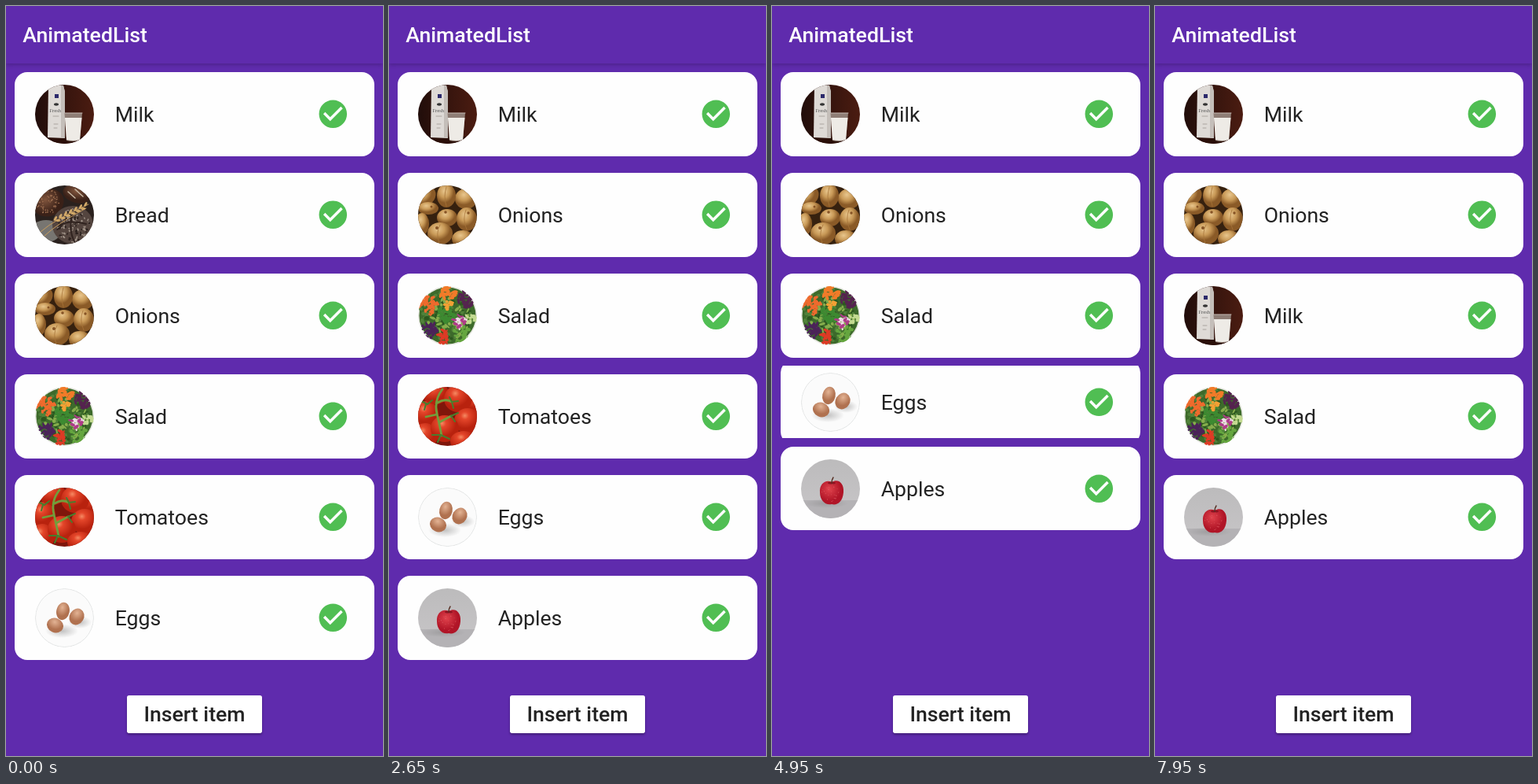
An HTML page that plays this animation: 480 px wide and 953 px high, repeating every 8 s.

```html
<!DOCTYPE html>
<html lang="en">
<head>
<meta charset="utf-8">
<title>AnimatedList</title>
<style>
  html, body { margin: 0; width: 100%; height: 100%; overflow: hidden; background: #5f2bad; }
  body { position: relative; font: 400 26.67px/32px Roboto, sans-serif; color: #222; }
  header {
    position: absolute; inset: 0 0 auto; height: 73.33px; box-sizing: border-box; z-index: 1;
    padding: 21px 21.33px; background: #5f2bad; color: #fff; font-weight: 500;
    box-shadow: 0 2px 5px rgba(0, 0, 0, .2);
  }
  main { position: absolute; top: 73.33px; left: 0; right: 0; height: 773.33px; overflow: hidden; }
  .slot { display: flex; align-items: center; overflow: hidden; margin: 0 10.67px; }
  .card {
    position: relative; flex: 0 0 100%; height: 106.67px;
    background: #fefefe; border-radius: 16px;
  }
  .card > * { position: absolute; }
  .photo { left: 26.4px; top: 15.8px; width: 75px; height: 75px; border-radius: 50%; overflow: hidden; }
  .label { left: 128px; top: 38px; }
  .check { left: 384px; top: 32px; width: 42.67px; height: 42.67px; fill: #50be53; }
  #insert {
    position: absolute; left: 154px; top: 875.7px; width: 172px; height: 48px;
    border-radius: 2.67px; text-align: center; line-height: 49px; font-weight: 500;
    box-shadow: 0 2px 3px rgba(0, 0, 0, .3);
  }
</style>
</head>
<body>
<svg width="0" height="0" style="position:absolute">
  <defs>
    <linearGradient id="wood"><stop stop-color="#210d0a"/><stop offset="1" stop-color="#4b1c11"/></linearGradient>
    <linearGradient id="wall" x2="0" y2="1"><stop stop-color="#bcbbbc"/><stop offset="1" stop-color="#c8c6c8"/></linearGradient>
    <radialGradient id="onion" cx=".4" cy=".3"><stop stop-color="#e8c68d"/><stop offset=".55" stop-color="#c99a58"/><stop offset="1" stop-color="#8a5a27"/></radialGradient>
    <radialGradient id="tomato" cx=".4" cy=".3"><stop stop-color="#f58a63"/><stop offset=".3" stop-color="#e4462a"/><stop offset="1" stop-color="#b8220e"/></radialGradient>
    <radialGradient id="egg" cx=".4" cy=".3"><stop stop-color="#e3b394"/><stop offset="1" stop-color="#b0714f"/></radialGradient>
    <radialGradient id="apple" cx=".4" cy=".35"><stop stop-color="#e0424c"/><stop offset="1" stop-color="#b01527"/></radialGradient>
    <radialGradient id="shade"><stop stop-color="#888" stop-opacity=".5"/><stop offset="1" stop-color="#888" stop-opacity="0"/></radialGradient>
    <radialGradient id="loaf" cx=".45" cy=".35"><stop stop-color="#80543c"/><stop offset="1" stop-color="#3a2118"/></radialGradient>
  </defs>
</svg>
<header>AnimatedList</header>
<main></main>
<div id="insert">Insert item</div>

<script>
const LOOP = 8000, SLOT = 128, DURATION = 300, FIRST_STEP = 83;

function seeded(seed) {
  return () => (seed = (seed * 16807) % 2147483647) / 2147483647;
}
const ellipse = (fill, x, y, rx, ry = rx, turn = 0) =>
  `<ellipse cx="${x}" cy="${y}" rx="${rx}" ry="${ry}" fill="${fill}" transform="rotate(${turn} ${x} ${y})"/>`;
const rect = (fill, x, y, w, h) =>
  `<rect x="${x}" y="${y}" width="${w}" height="${h}" fill="${fill}"/>`;
const line = (d, color, width) =>
  `<path d="${d}" fill="none" stroke="${color}" stroke-width="${width}" stroke-linecap="round"/>`;
const round = (fill, places) => places.map(p => ellipse(fill, ...p)).join('');

// Scatters small flakes around a centre.
function flakes(random, count, color, x, y, spread, size) {
  return Array.from({ length: count }, () => {
    const angle = random() * 2 * Math.PI, distance = Math.sqrt(random()) * spread;
    return ellipse(color, x + Math.cos(angle) * distance, y + Math.sin(angle) * distance,
      size * (.6 + random()), size * (.4 + random() * .5), random() * 180);
  }).join('');
}

function milk() {
  return rect('url(#wood)', 0, 0, 75, 75) + rect('#2a0f09', 0, 66, 75, 9) +
    '<path d="M17 1H36L38 9V68L16 67Z" fill="#dedad6"/><path d="M33 1H36L38 9V68L33 67Z" fill="#c4beb9"/>' +
    rect('#2c2a6b', 25, 12, 5, 5) + ellipse('#333', 27, 25, 3, 1.7) +
    '<text x="18.5" y="35" font-size="5.5" font-family="Noto Serif, serif" fill="#555">Fresh</text>' +
    line('M23 40h7M24 50h5M24 55h4', '#aaa49f', 1) +
    '<path d="M37.5 36H60L57 71Q48 73 40 71Z" fill="#8e7d75"/>' +
    '<path d="M38 42H59.5L57 70Q48 72 40 70Z" fill="#eeebe6"/>' +
    line('M38 36H60', '#c7bbb5', 1);
}

function bread() {
  const random = seeded(11);
  const ears = Array.from({ length: 13 }, (_, i) =>
    ellipse('#d2a968', 26 + i * 3.2, 44 - i * 1.5 + (i % 2 ? 2 : -2), 3.2, 1.4, i % 2 ? -5 : -60)).join('');
  return rect('#2a211e', 0, 0, 75, 75) + ellipse('#777571', 14, 58, 19, 14) +
    ellipse('url(#loaf)', 17, 22, 20, 17, -25) + flakes(random, 50, '#9d6e50', 17, 21, 15, 1) +
    ellipse('url(#loaf)', 53, 11, 18, 11, 15) + line('M42 8l9 8M51 5l10 9', '#c7b7a3', 1.5) +
    ellipse('#54453f', 48, 50, 26, 24) + flakes(random, 70, '#a2958a', 48, 51, 22, 1.3) +
    flakes(random, 38, '#2b211e', 48, 52, 22, 1.6) +
    line('M30 52Q42 43 65 49M48 36Q42 56 50 71', '#30231f', 2) +
    line('M7 59Q25 43 68 24M12 64Q29 48 65 29', '#c69b5d', 1) + ears;
}

function onions() {
  return rect('#36210f', 0, 0, 75, 75) + round('url(#onion)', [
    [9, 13, 14, 12, -30], [61, 17, 14, 13], [36, 13, 12, 15], [13, 29, 13, 8], [5, 49, 9, 14],
    [37, 41, 13, 11], [62, 43, 13, 15], [28, 61, 16, 14], [57, 68, 14, 11]
  ]) + line('M36 2Q32 14 36 26M28 50Q22 61 27 73M61 31Q56 43 62 56', '#a77439', .8) +
    round('#865325', [[24, 54, 2], [35, 34, 1.8], [64, 35, 1.7], [17, 27, 1.5]]);
}

function salad() {
  const random = seeded(29);
  const clusters = [
    ['#51823a', 36, 36, 34, 95], ['#2c571f', 36, 40, 30, 55], ['#86ad4c', 40, 40, 29, 45],
    ['#ef6a2d', 13, 24, 12, 42], ['#f27b29', 38, 9, 10, 30], ['#55234f', 61, 16, 11, 32],
    ['#4b2359', 14, 56, 10, 28], ['#de3a25', 32, 65, 9, 20], ['#3d8a31', 37, 35, 11, 42],
    ['#efdce8', 52, 46, 8, 13], ['#ad3c87', 51, 43, 9, 10], ['#c3da91', 67, 41, 6, 12],
    ['#f3a034', 38, 23, 6, 10], ['#65a63f', 56, 61, 11, 25]
  ];
  return rect('#e2e4dc', 0, 0, 75, 75) + ellipse('#3d6a2b', 37.5, 37.5, 36) +
    clusters.map(([color, x, y, spread, count]) => flakes(random, count, color, x, y, spread, 2.6)).join('');
}

function tomatoes() {
  return rect('#7f160b', 0, 0, 75, 75) + round('url(#tomato)', [
    [10, 34, 16], [22, 8, 17, 14], [70, 18, 14], [51, 15, 18, 17], [63, 43, 17, 16],
    [9, 62, 16], [34, 53, 18, 17], [58, 69, 17, 13]
  ]) + line('M31 3Q20 17 24 34T30 62M25 20Q34 14 43 19M24 35L10 38M27 45L42 37', '#719e3b', 2.8) +
    line('M4 18L12 22L18 17M10 22L8 29M40 13L43 19L51 18M43 19L45 27M18 61L29 61L40 66M29 61L25 70M42 37L51 33M42 37L47 44',
      '#487d2d', 2);
}

function eggs() {
  return rect('#fbfbfb', 0, 0, 75, 75) +
    round('url(#shade)', [[34, 54, 21, 9], [57, 43, 15, 8]]) +
    round('url(#egg)', [[35.5, 29, 8.3, 11.3, 12], [53, 36, 9.2, 10.8, 30], [25.5, 47, 10.8, 9.2, 25]]) +
    '<circle cx="37.5" cy="37.5" r="37" fill="none" stroke="#e2e4e4"/>';
}

function apples() {
  const random = seeded(5);
  return rect('url(#wall)', 0, 0, 75, 75) + rect('#b4b2b5', 0, 52, 75, 23) +
    ellipse('url(#shade)', 32, 56, 28, 6) +
    '<path d="M39 29C48 24 55 31 54 42C53 55 45 59 39 57C31 59 24 52 24 42C23 31 32 25 39 29Z" fill="url(#apple)"/>' +
    flakes(random, 24, '#dd5961', 38, 42, 12, .6) +
    ellipse('#8c1422', 39, 30, 5, 1.6) + line('M39 30Q39 26 41 23', '#573024', 1.4);
}

const items = [
  { label: 'Milk', photo: milk },
  { label: 'Bread', photo: bread, removed: 1516 },
  { label: 'Onions', photo: onions },
  { label: 'Milk', photo: milk, inserted: 6366 },
  { label: 'Salad', photo: salad },
  { label: 'Tomatoes', photo: tomatoes, removed: 2916 },
  { label: 'Eggs', photo: eggs, removed: 4866 },
  { label: 'Apples', photo: apples, inserted: 1066 }
];
const presses = [1050, 6350];
const CHECK = 'M12 2C6.48 2 2 6.48 2 12s4.48 10 10 10 10-4.48 10-10S17.52 2 12 2z' +
  'm-2 15l-5-5 1.41-1.41L10 14.17l7.59-7.59L19 8l-9 9z';

const list = document.querySelector('main');
const button = document.getElementById('insert');

for (const item of items) {
  item.slot = document.createElement('div');
  item.slot.className = 'slot';
  item.slot.innerHTML = `<div class="card">
    <svg class="photo" viewBox="0 0 75 75">${item.photo()}</svg>
    <span class="label">${item.label}</span>
    <svg class="check" viewBox="0 0 24 24"><path d="${CHECK}"/></svg>
  </div>`;
  list.append(item.slot);
}

// The size starts to change visibly only after the first delayed step.
function progress(time, start) {
  const elapsed = time - start;
  return elapsed < FIRST_STEP ? 0 : Math.min(1, elapsed / DURATION);
}

function pressShade(elapsed) {
  if (elapsed < 0 || elapsed > 450) return 0;
  return .065 * Math.min(1, (elapsed + 30) / 130, (450 - elapsed) / 250);
}

function draw(now) {
  const time = now % LOOP;
  for (const { slot, inserted, removed } of items) {
    let size = 1;
    if (inserted !== undefined) size = progress(time, inserted);
    if (removed !== undefined) size = 1 - progress(time, removed);
    slot.style.height = size * SLOT + 'px';
  }
  const shade = Math.max(...presses.map(start => pressShade(time - start)));
  const level = Math.round(255 * (1 - shade));
  button.style.background = `rgb(${level}, ${level}, ${level})`;
}

const start = performance.now();
function tick(now) {
  draw(Math.max(0, now - start));
  requestAnimationFrame(tick);
}
draw(0);
requestAnimationFrame(tick);
</script>
</body>
</html>
```
